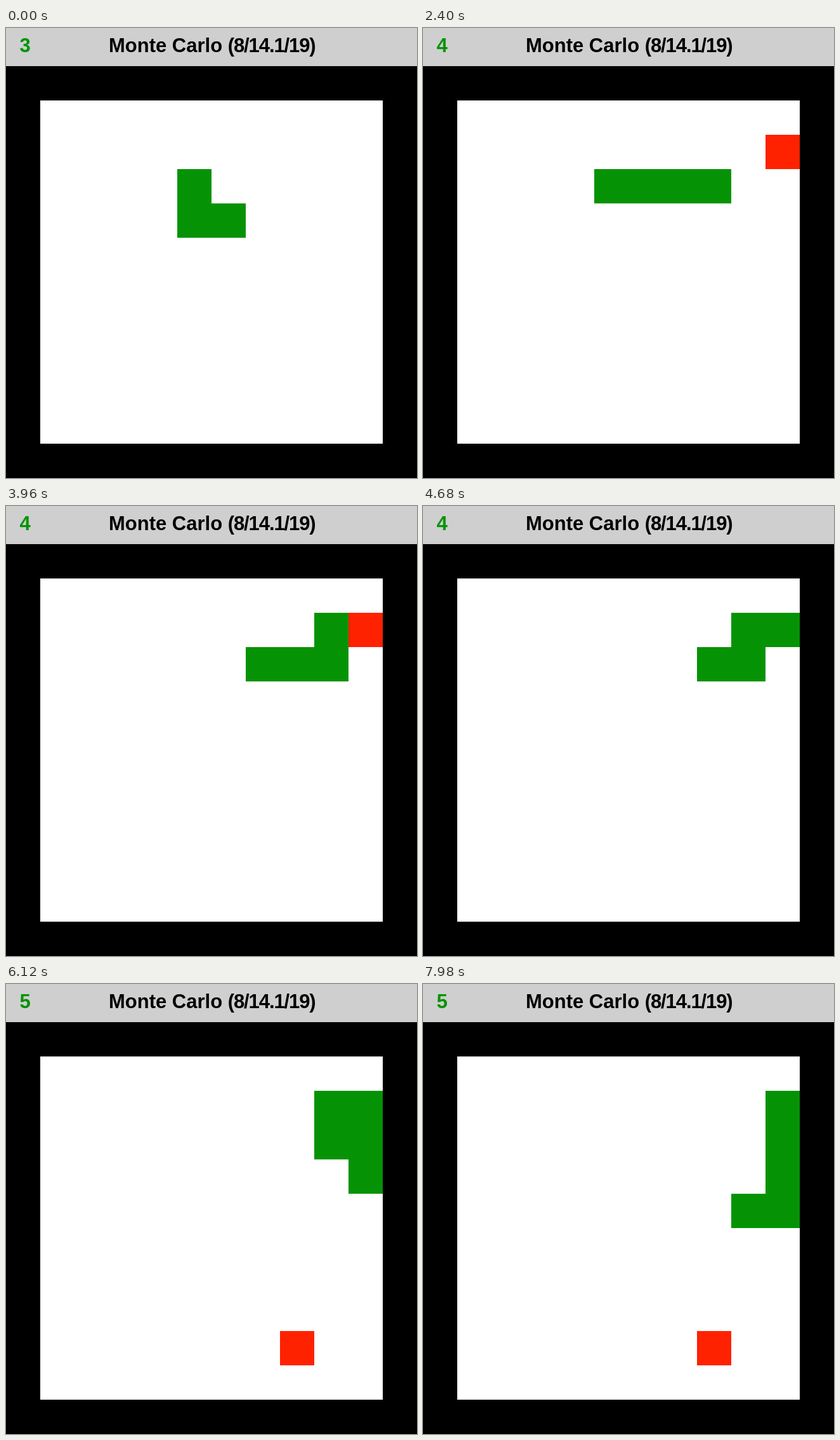
Recreate the animation shown at these times as an HTML page. Size 648 by 708 pixels, loop 8 s.

```html
<!DOCTYPE html>
<html lang="en">
<head>
<meta charset="utf-8">
<title>Snake</title>
<style>
  html, body { margin: 0; width: 100%; height: 100%; overflow: hidden; background: #000; }
  svg { display: block; }
  text { font: bold 31px "Liberation Sans", Arial, sans-serif; }
  .stats { letter-spacing: -1.1px; }
</style>
</head>
<body>
<svg width="648" height="708" viewBox="0 0 648 708">
  <rect width="648" height="708"/>
  <rect width="648" height="60" fill="#cfcfcf"/>
  <rect x="54" y="114" width="540" height="540" fill="#fff"/>
  <text id="score" x="21.5" y="38" fill="#059305">3</text>
  <text x="162" y="38">Monte Carlo <tspan class="stats">(8/14.1/19)</tspan></text>
  <path id="food" fill="#ff2200"/>
  <path id="snake" fill="#059305"/>
</svg>
<script>
  const LOOP = 8000, CELL = 54;
  const route = "LURRRRURDDDL";
  const steps = { L: [-1, 0], R: [1, 0], U: [0, -1], D: [0, 1] };
  const meals = [[4, 2], [9, 1], [7, 8]];

  // Cells the head visits, as [column, row]
  const trail = [[5, 3]];
  for (const key of route) {
    const [col, row] = trail.at(-1), [dx, dy] = steps[key];
    trail.push([col + dx, row + dy]);
  }

  const [score, food, snake] = ["score", "food", "snake"].map(id => document.getElementById(id));
  const square = ([col, row]) =>
    `M${CELL * (col + 1)} ${60 + CELL * (row + 1)}h${CELL}v${CELL}h${-CELL}z`;

  // One move every 780 ms, speeding up to 720 ms halfway
  const movesAt = t => t < 60 ? 0 :
    Math.floor(Math.min(t - 60, 3900) / 780 + Math.max(t - 3960, 0) / 720);

  let shown = -1;

  function draw(time) {
    const head = 2 + movesAt(time % LOOP);
    if (head !== shown) {
      // A meal counts on the move after the head reaches it
      const past = trail.slice(0, head).map(String);
      const eaten = meals.filter(meal => past.includes(String(meal))).length;
      const length = 3 + eaten;
      score.textContent = length;
      food.setAttribute("d", square(meals[eaten]));
      snake.setAttribute("d", trail.slice(head + 1 - length, head + 1).map(square).join(""));
      shown = head;
    }
    requestAnimationFrame(draw);
  }

  draw(performance.now());
</script>
</body>
</html>
```
